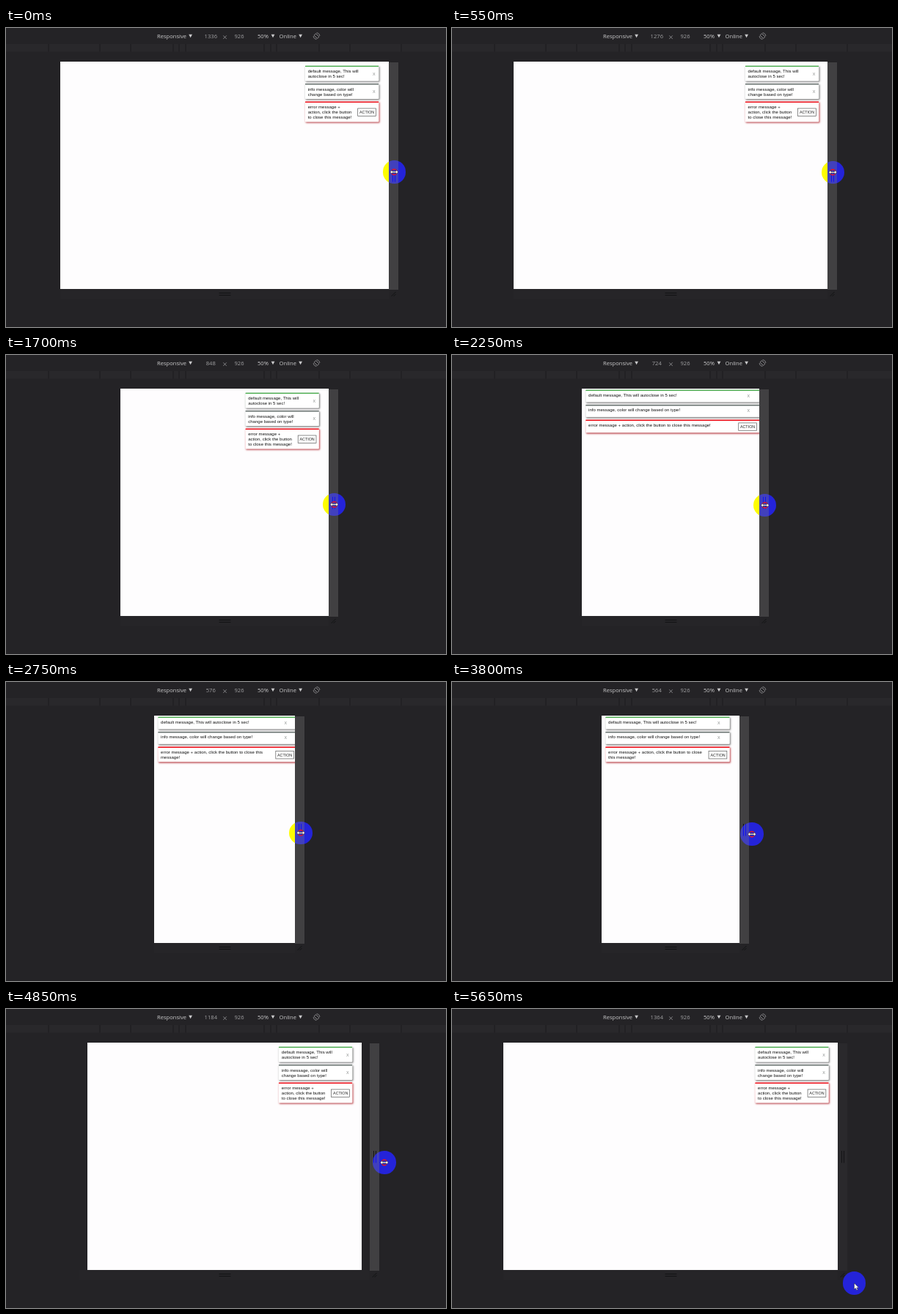
An HTML page that plays this animation: 600x409 px, repeating every 5.7 s.

```html
<!DOCTYPE html>
<html lang="en">
<head>
<meta charset="utf-8">
<title>Responsive messages</title>
<style>
  html, body { margin: 0; width: 100%; height: 100%; overflow: hidden; background: #242326; }
  #stage { position: absolute; left: 0; top: 0; width: 600px; height: 409px; overflow: hidden; background: #242326; isolation: isolate; }
  #stage > * { position: absolute; left: 0; top: 0; }
  #chrome { font-family: "Open Sans", "Noto Sans", sans-serif; }
  #stage > #page { top: 46px; height: 311px; overflow: hidden; background: #fefdfe; }
  #view { position: absolute; left: 0; top: 0; height: 928px; transform: scale(.335); transform-origin: 0 0;
          font: 18px/21px "Liberation Sans", Arial, sans-serif; color: #111; }
  #list { position: absolute; top: 16px; left: calc(100% - 340px); width: 301px; }
  .card { display: flex; align-items: flex-start; box-sizing: border-box; min-height: 51px; margin-bottom: 10px;
          padding: 7px 10px 8px 11px; background: #fff; border: 1px solid var(--edge); border-top: 6px solid var(--bar);
          border-bottom: 0; border-radius: 3px; box-shadow: 3px 4px 7px var(--shade); }
  .card p { flex: 1; margin: 0 20px 0 0; }
  .card b { align-self: center; font-weight: normal; font-size: 16px; }
  .close { margin-right: 4px; color: #858a88; }
  .action { box-sizing: border-box; width: 76px; height: 33px; border: 2px solid #555; line-height: 29px; text-align: center; color: #222; }
  #list.narrow { top: 4px; left: 15px; width: calc(100% - 30px); }
  .narrow .close { margin: 0 29px 4px 0; }
  #stage > #handle { top: 47px; width: 13px; height: 311px; }
  #stage > #base { top: 357px; height: 14px; background: #262528; }
  #halo { width: 31.4px; height: 31.4px; margin: -15.7px; border-radius: 50%; background: #00f; mix-blend-mode: difference; }
</style>
</head>
<body>
<div id="stage">
  <svg id="chrome" width="600" height="409">
    <rect y="22" width="600" height="10.5" fill="#29282b"/>
    <g id="ticks" fill="#222124"></g>
    <g font-size="7.6" fill="#c9c9ca">
      <text x="206" y="13.8">Responsive</text>
      <text x="343" y="13.8">50%</text>
      <text x="372.6" y="13.8">Online</text>
      <g fill="#a0a0a2" text-anchor="middle">
        <text id="size" x="279.3" y="13.8"></text>
        <text x="318" y="13.8">926</text>
      </g>
    </g>
    <path d="M249.2 8.8h4.8l-2.4 4.4zM361.6 8.8h4.8l-2.4 4.4zM399.2 8.8h4.8l-2.4 4.4z" fill="#c9c9ca"/>
    <path d="M296.3 10.4l4.4 4.4m0-4.4l-4.4 4.4" stroke="#a0a0a2" stroke-width=".8"/>
    <g fill="none" stroke="#a0a0a2" stroke-width=".8" transform="translate(423.5 11)">
      <rect x="-1.7" y="-3.2" width="3.4" height="6.4" rx=".5" transform="rotate(-45)"/>
      <path d="M0-4.3A4.3 4.3 0 0 1 4.3 0M0 4.3A4.3 4.3 0 0 1-4.3 0"/>
    </g>
  </svg>
  <div id="base"></div>
  <div id="handle"></div>
  <svg width="600" height="409" fill="none" stroke="#121214">
    <path d="M290.5 362.5h16m-16 3h16"/>
    <g id="side">
      <path d="M5.5 194v16.5m3-16.5v16.5"/>
      <path d="M3.5 367l6-6m-3 6l3-3" stroke-width=".9"/>
    </g>
  </svg>
  <div id="page"><div id="view"><div id="list"></div></div></div>
  <div id="halo"></div>
  <svg width="600" height="409">
    <g id="resize">
      <circle r="3.7" fill="none" stroke="#e3142c" stroke-width="1.6"/>
      <path d="M-5.6 0l3-2.8v1.9h5.2v-1.9l3 2.8-3 2.8v-1.9h-5.2v1.9z" fill="#fff" stroke="#222" stroke-width=".6"/>
    </g>
    <path id="arrow" d="M0 0v8.6l2-1.9 1.400 3 1.400-.6-1.300-2.900h2.700z" fill="#fff" stroke="#222" stroke-width=".5"/>
  </svg>
</div>
<script>
const LOOP = 5700, STEP = 50, SCALE = 0.335, MID = 298.5, BREAK = 768;
const TURN = 3700, RELEASE = 5500, EXIT = 150;
const $ = id => document.getElementById(id);

// key points of the drag: [time, value]
const widths = [[0, 1336], [600, 1270], [940, 1120], [1020, 1120], [1200, 1085], [1640, 848], [1720, 848],
                [2400, 690], [2750, 576], [3500, 536], [TURN, 536], [3800, 564], [4250, 770], [4850, 1184], [5350, 1364]];
const grips = [[TURN, 7], [3800, 16], [4850, 19], [5400, 8]];
const heights = [[0, 197], [900, 197.5], [1700, 204.5], [4850, 210], [RELEASE, 207]];

const cards = [
  ["default message, This will autoclose in 5 sec!", "#4caf50", "#c5d2c6", "#777"],
  ["info message, color will change based on type!", "#6d7774", "#ccd0cf", "#777"],
  ["error message + action, click the button to close this message!", "#ee0a14", "#f5a0a6", "#bb4a50", true]
];

$("list").innerHTML = cards.map(([text, bar, edge, shade, action]) =>
  `<div class="card" style="--bar:${bar};--edge:${edge};--shade:${shade}"><p>${text}</p>` +
  (action ? '<b class="action">ACTION</b>' : '<b class="close">X</b>') + "</div>").join("");

// ruler gaps mirror around the middle
$("ticks").innerHTML = [53.5, 62.5, 70.5, 128.5, 170.5, 240.5]
  .flatMap(d => [MID - d, MID + d])
  .map(x => `<rect x="${x - 1}" y="22" width="2" height="10.5"/>`).join("");

function along(keys, t) {
  const i = keys.findIndex(k => k[0] > t);
  if (i < 0) return keys[keys.length - 1][1];
  if (i === 0) return keys[0][1];
  const [t0, a] = keys[i - 1], [t1, b] = keys[i];
  return a + (b - a) * (t - t0) / (t1 - t0);
}

function place(id, left, right) {
  $(id).style.left = left + "px";
  $(id).style.width = right - left + "px";
}

const edges = w => [-1, 1].map(side => Math.floor(MID + side * w * SCALE / 2));

function draw(t) {
  const width = Math.round(along(widths, t) / 2) * 2;
  // the layout trails the drag, more so while growing; paint waits for it above the breakpoint
  const layout = along(widths, t - (t < TURN ? 60 : 95));
  const painted = Math.min(width, Math.max(layout, BREAK));
  const [left, right] = edges(width);
  const held = t <= RELEASE;

  $("size").textContent = width;
  place("page", ...edges(painted));
  place("base", left, right);
  $("view").style.width = layout + "px";
  $("list").className = layout < BREAK ? "narrow" : "";
  $("handle").style.left = right + "px";
  $("handle").style.background = held ? "#414042" : "#2a292c";
  $("side").setAttribute("transform", `translate(${right} 0)`);

  const away = Math.max(0, (t - RELEASE) / EXIT) ** 1.5;
  const x = MID + width * SCALE / 2 + along(grips, t) + 13.5 * away;
  const y = along(heights, t) + 168 * away;
  $("halo").style.left = x + "px";
  $("halo").style.top = y + "px";
  for (const [id, on] of [["resize", held], ["arrow", !held]]) {
    $(id).setAttribute("transform", `translate(${x} ${y})`);
    $(id).style.display = on ? "" : "none";
  }
}

const start = performance.now();
function tick() {
  const t = (performance.now() - start) % LOOP;
  draw(Math.floor(t / STEP) * STEP);
  requestAnimationFrame(tick);
}
tick();
</script>
</body>
</html>
```
